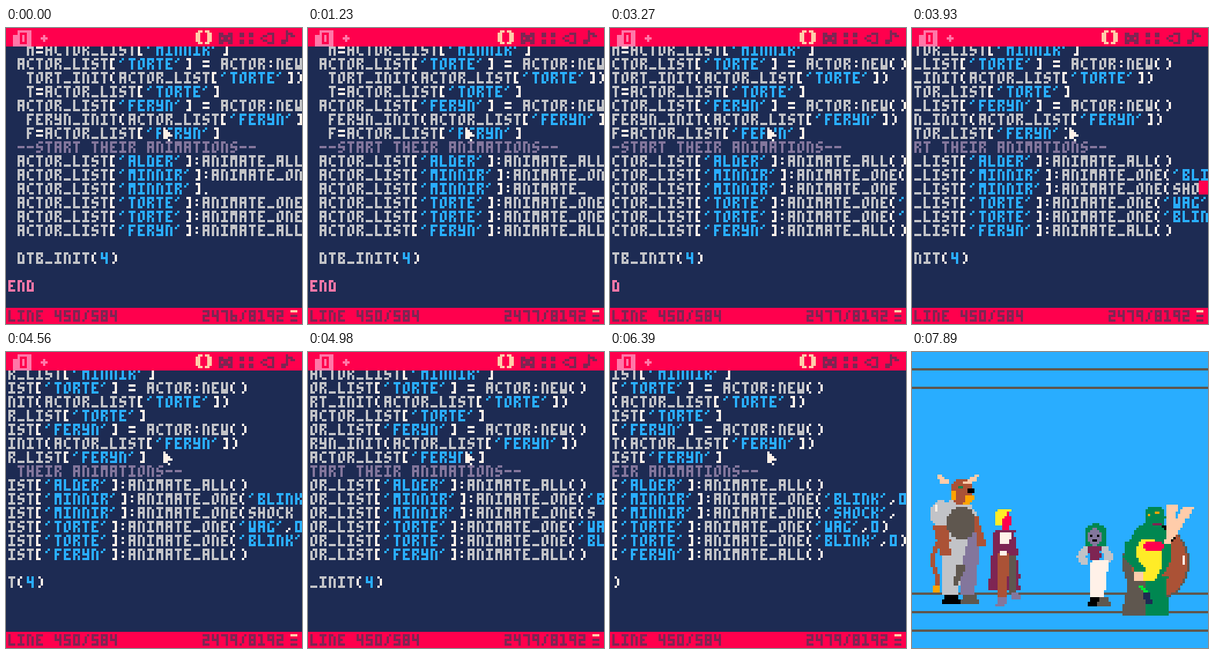
An HTML page with a canvas that plays this animation: 384 by 384 pixels, repeating every 8000 ms.

```html
<!DOCTYPE html>
<html lang="en">
<head>
<meta charset="utf-8">
<title>Code editor</title>
<style>
html, body { margin: 0; height: 100%; overflow: hidden; background: #1d2b53; }
canvas { display: block; width: 100vw; height: 100vh; image-rendering: pixelated; }
</style>
</head>
<body>
<canvas width="128" height="128"></canvas>
<script>
const ctx = document.querySelector('canvas').getContext('2d');
const LOOP = 8000, RUN_AT = 7140, COLUMNS = 31, EDIT_ROW = 10;
const C = {
  black: '#000000', navy: '#1d2b53', plum: '#7e2553', green: '#008751', brown: '#ab5236',
  dark: '#5f574f', gray: '#c2c3c7', white: '#fff1e8', red: '#ff004d', orange: '#ffa300',
  yellow: '#ffec27', lime: '#00e436', blue: '#29adff', mauve: '#83769c', pink: '#ff77a8', peach: '#ffccaa'
};

// Segment display on a 3 x 5 grid: bars, half columns and single dots.
const SEGMENTS = {};
[...'ahgjd'].forEach((key, y) => SEGMENTS[key] = [0, y, 3, 1]);
[...'febc'].forEach((key, i) => SEGMENTS[key] = [i < 2 ? 0 : 2, i % 2 * 2, 1, 3]);
['vpwqo', 'tmxnu', 'kyrzi'].forEach((keys, x) =>
  [...keys].forEach((key, y) => SEGMENTS[key] = [x, y, 1, 1]));

// Lit segments per character; a capital cuts that dot out again.
const GLYPHS = {
  A: 'abcefg', B: 'abcdefgR', C: 'adefVO', D: 'abcdefK', E: 'adefgR', F: 'aefgR', G: 'acdefVR',
  H: 'bcefg', I: 'amxnd', K: 'bcefgR', L: 'def', M: 'abcefm', N: 'abcefK', O: 'abcdefVI',
  R: 'abcefgR', S: 'acdfgVI', T: 'amxnu', W: 'bcdefn', Y: 'bcdfg',
  0: 'abcdef', 1: 'amxndK', 2: 'abdeg', 4: 'bcfg', 5: 'acdfg', 6: 'cdefg', 7: 'abc', 8: 'abcdefg', 9: 'abcfg',
  '(': 'efVOtu', ')': 'bcKItu', '[': 'eftu', ']': 'bctu', "'": 'tp', ':': 'mn', '=': 'hj',
  _: 'd', '-': 'g', '/': 'kmxno', ',': 'no', '.': 'u'
};

const CODE = `  M=ACTOR_LIST['MINNIR']
 ACTOR_LIST['TORTE'] = ACTOR:NEW()
  TORT_INIT(ACTOR_LIST['TORTE'])
  T=ACTOR_LIST['TORTE']
 ACTOR_LIST['FERYN'] = ACTOR:NEW()
  FERYN_INIT(ACTOR_LIST['FERYN'])
  F=ACTOR_LIST['FERYN']
 --START THEIR ANIMATIONS--
 ACTOR_LIST['ALDER']:ANIMATE_ALL()
 ACTOR_LIST['MINNIR']:ANIMATE_ONE('BLINK',0)
 ACTOR_LIST['MINNIR']
 ACTOR_LIST['TORTE']:ANIMATE_ONE('WAG',0)
 ACTOR_LIST['TORTE']:ANIMATE_ONE('BLINK',0)
 ACTOR_LIST['FERYN']:ANIMATE_ALL()

 DTB_INIT(4)

END`.split('\n');

// Bursts of typing: first key, last key, keys ("<" is backspace).
const TYPING = [
  [30, 960, '<:ANIMATE'], [1110, 1950, '_ONE)'], [2490, 3270, 'SHOCK<<<<<<'],
  [3420, 4110, '(SHOCK'], [4650, 5250, "<<<<<'SH"], [5460, 6390, "OCK',"], [6540, 6720, '0)']
];

function rect(color, x, y, w = 1, h = 1) {
  ctx.fillStyle = color;
  ctx.fillRect(x, y, w, h);
}

// A tapering bar drawn row by row, so edges stay on whole pixels.
function limb(color, x1, y1, x2, y2, w1, w2 = w1) {
  for (let y = y1; y < y2; y++) {
    const k = (y - y1) / (y2 - y1), w = w1 + (w2 - w1) * k;
    rect(color, Math.round(x1 + (x2 - x1) * k - w / 2), y, Math.round(w));
  }
}

function blob(color, cx, cy, rx, ry) {
  for (let y = Math.round(cy - ry); y < cy + ry; y++) {
    const half = rx * Math.sqrt(Math.max(0, 1 - ((y + 0.5 - cy) / ry) ** 2));
    const left = Math.round(cx - half);
    rect(color, left, y, Math.round(cx + half) - left);
  }
}

function shoe(color, x, y, length) {
  rect(color, x + 1, y, length - 2, 2);
  rect(color, x, y + 2, length, 2);
}

function glyphDots(char) {
  const dots = new Set();
  for (const key of GLYPHS[char] || '') {
    const [x, y, w, h] = SEGMENTS[key.toLowerCase()];
    for (let i = 0; i < w * h; i++) {
      const dot = x + i % w + 3 * (y + Math.floor(i / w));
      key < 'a' ? dots.delete(dot) : dots.add(dot);
    }
  }
  return dots;
}

function print(text, x, y, color) {
  [...text].forEach((char, i) => {
    for (const dot of glyphDots(char)) rect(color, x + i * 4 + dot % 3, y + Math.floor(dot / 3));
  });
}

function tokenColor(token) {
  if (token.startsWith('--')) return C.mauve;
  if (token === 'END') return C.pink;
  if (/^['\d]/.test(token)) return C.blue;
  return /^\w/.test(token) ? C.gray : C.white;
}

function printCode(line, x, y) {
  for (const token of line.match(/--.*|'[^']*'?|\w+|./g) || []) {
    print(token, x, y, tokenColor(token));
    x += token.length * 4;
  }
}

function typedAt(t) {
  let text = '.';
  for (const [start, end, keys] of TYPING)
    [...keys].forEach((key, i) => {
      if (t + 10 < start + i * (end - start) / (keys.length - 1)) return;
      text = key === '<' ? text.slice(0, -1) : text + key;
    });
  return text;
}

function drawIcons() {
  rect(C.pink, 5, 1, 6, 7);
  rect(C.pink, 3, 3, 2, 5);
  print('0', 6, 2, C.red);
  rect(C.pink, 15, 4, 3);
  rect(C.pink, 16, 3, 1, 3);
  for (const [inner, outer] of [[83, 82], [86, 87]]) {
    rect(C.peach, inner, 1, 2, 6);
    rect(C.red, inner === 83 ? 84 : 86, 2, 1, 4);
    rect(C.peach, outer, 2, 2, 4);
  }
  rect(C.plum, 92, 2, 6, 5);
  for (const x of [93, 96]) rect(C.red, x, 4);
  rect(C.red, 94, 2, 2);
  rect(C.red, 94, 6, 2);
  for (const x of [101, 105]) for (const y of [2, 5]) rect(C.plum, x, y, 2, 2);
  for (let i = 0; i < 5; i++)
    for (const side of [-1, 1]) rect(C.plum, 110 + i, 4 + side * Math.ceil(i / 2));
  rect(C.plum, 115, 2, 1, 5);
  rect(C.plum, 121, 1, 1, 5);
  rect(C.plum, 122, 2, 2);
  rect(C.plum, 123, 3, 2);
  rect(C.plum, 119, 5, 2, 2);
}

function drawBars(tokens) {
  rect(C.red, 0, 0, 128, 8);
  rect(C.red, 0, 121, 128, 7);
  drawIcons();
  print('LINE 450/584', 1, 122, C.plum);
  print(tokens + '/8192', 85, 122, C.plum);
  rect(C.peach, 123, 122, 3);
  for (const y of [124, 126]) rect(C.plum, 123, y, 3);
}

function drawPointer(x, y) {
  for (let i = 0; i < 4; i++) {
    rect(C.navy, x - 1, y + i, i + 3);
    rect(C.white, x, y + i, i + 1);
  }
  rect(C.navy, x - 1, y + 4, 5, 2);
  rect(C.white, x, y + 4, 2);
  rect(C.white, x + 2, y + 5);
}

function drawEditor(t) {
  const typed = typedAt(t);
  const column = CODE[EDIT_ROW].length + typed.length;
  const scroll = Math.max(0, column - COLUMNS);
  rect(C.navy, 0, 0, 128, 128);
  CODE.forEach((line, row) =>
    printCode(row === EDIT_ROW ? line + typed : line, 1 - scroll * 4, 7 + row * 6));
  rect(C.navy, 0, 8, 1, 113);
  const phase = t % 480;
  if (phase >= 30 && phase < 140) rect(C.red, (column - scroll) * 4, 66, 5, 6);
  drawPointer(68, 43);
  drawBars(2476 + (typed.match(/\w+|'\w*'?|\(/g) || []).length);
}

function drawMinotaur() {
  for (let y = 82; y < 102; y++) rect(C.brown, 9 + Math.round(Math.sin(y / 3)), y, 2);
  rect(C.orange, 9, 101, 3, 3);
  limb(C.mauve, 25, 78, 24, 105, 9, 6);
  limb(C.gray, 19, 79, 16, 105, 10, 7);
  limb(C.dark, 21, 92, 19, 101, 4, 2);
  blob(C.gray, 19, 72, 9, 8);
  blob(C.gray, 12.5, 70, 4.5, 6);
  blob(C.dark, 21.5, 74, 6.5, 7);
  limb(C.brown, 12, 75, 15, 88, 6, 5);
  limb(C.brown, 28, 71, 30, 84, 2, 4);
  rect(C.white, 10, 66, 1, 3);
  blob(C.brown, 21.5, 60.5, 5, 6);
  for (const side of [-1, 1]) limb(C.peach, 19.5 + side * 8, 53, 19.5 + side * 4, 57, 2, 5);
  rect(C.green, 20, 58, 2);
  rect(C.orange, 17, 60, 2, 4);
  limb(C.orange, 25, 62, 23, 66, 4, 2);
  rect(C.black, 24, 59, 3, 2);
  shoe(C.black, 13, 105, 8);
  shoe(C.dark, 21, 105, 8);
}

function drawHero() {
  limb(C.plum, 40, 77, 40, 103, 9, 14);
  limb(C.brown, 39.5, 87, 39, 106, 5, 4);
  limb(C.dark, 43, 88, 43, 105, 3);
  limb(C.white, 40.5, 78, 40, 88, 5, 3);
  rect(C.plum, 38, 83, 5, 3);
  blob(C.red, 40.5, 73, 2.5, 4);
  limb(C.yellow, 39.5, 68, 37, 75, 6, 2);
  rect(C.red, 39, 72, 4, 3);
  limb(C.mauve, 39, 106, 38, 110, 4);
  limb(C.mauve, 44, 104, 45.5, 107, 3, 5);
}

function drawBard() {
  blob(C.green, 79.5, 80, 5, 6);
  for (const side of [-1, 1]) {
    limb(C.gray, 79 + side * 4, 84, 79 + side * 6, 88, 3, 4);
    limb(C.gray, 79 + side * 6, 88, 79 + side * 4, 92, 4, 3);
    rect(C.black, 79 + side, 79);
  }
  blob(C.mauve, 79, 80, 3, 4);
  for (const x of [77, 80]) rect(C.black, x, 79);
  rect(C.black, 78, 81, 2);
  limb(C.plum, 79, 84, 79, 90, 6, 4);
  limb(C.white, 80.5, 90, 80.5, 107, 8, 6);
  rect(C.blue, 76, 90, 2);
  shoe(C.black, 76, 106, 6);
  shoe(C.dark, 80, 106, 6);
}

function drawTurtle(t) {
  blob(C.dark, 105.5, 91, 14.5, 16);
  blob(C.brown, 107, 91, 12, 15);
  rect(C.white, 117, 88, 1, 4);
  limb(C.dark, 98, 98, 95.5, 114, 9, 10);
  limb(C.green, 106, 97, 106, 114, 9, 10);
  blob(C.black, 110, 79, 4, 4);
  blob(C.green, 103, 86, 9.5, 12);
  blob(C.yellow, 102, 90, 6, 9.5);
  limb(C.green, 94, 82, 94, 89, 5);
  limb(C.green, 94, 88, 100, 95, 6, 4);
  blob(C.green, 105, 71.5, 4.5, 5);
  rect(C.orange, 102, 70);
  rect(C.orange, 105, 69, 2);
  rect(C.plum, 104, 74, 4);
  limb(C.peach, 112, 66, 111, 80, 5, 2);
  limb(C.peach, 119.5, 67, 109.5, 83, 5, 3);
  blob(C.red, 104.5, 84, 4.5, 2.5);
  limb(C.lime, 99, 101, 102, 105, 2);
  blob(C.peach, 98, 97, 2.5, 2.5);
  limb(C.navy, 101, 104, 103, 109, 3);
  if (t >= 7710 && t < 7880) rect(C.green, 110, 107, 3, 3);
}

function drawGame(t) {
  rect(C.blue, 0, 0, 128, 128);
  for (const y of [7, 15, 104, 112, 120]) rect(C.dark, 0, y, 128);
  drawMinotaur();
  drawHero();
  drawBard();
  drawTurtle(t);
}

function tick() {
  const t = performance.now() % LOOP;
  (t < RUN_AT ? drawEditor : drawGame)(t);
  requestAnimationFrame(tick);
}
tick();
</script>
</body>
</html>
```
